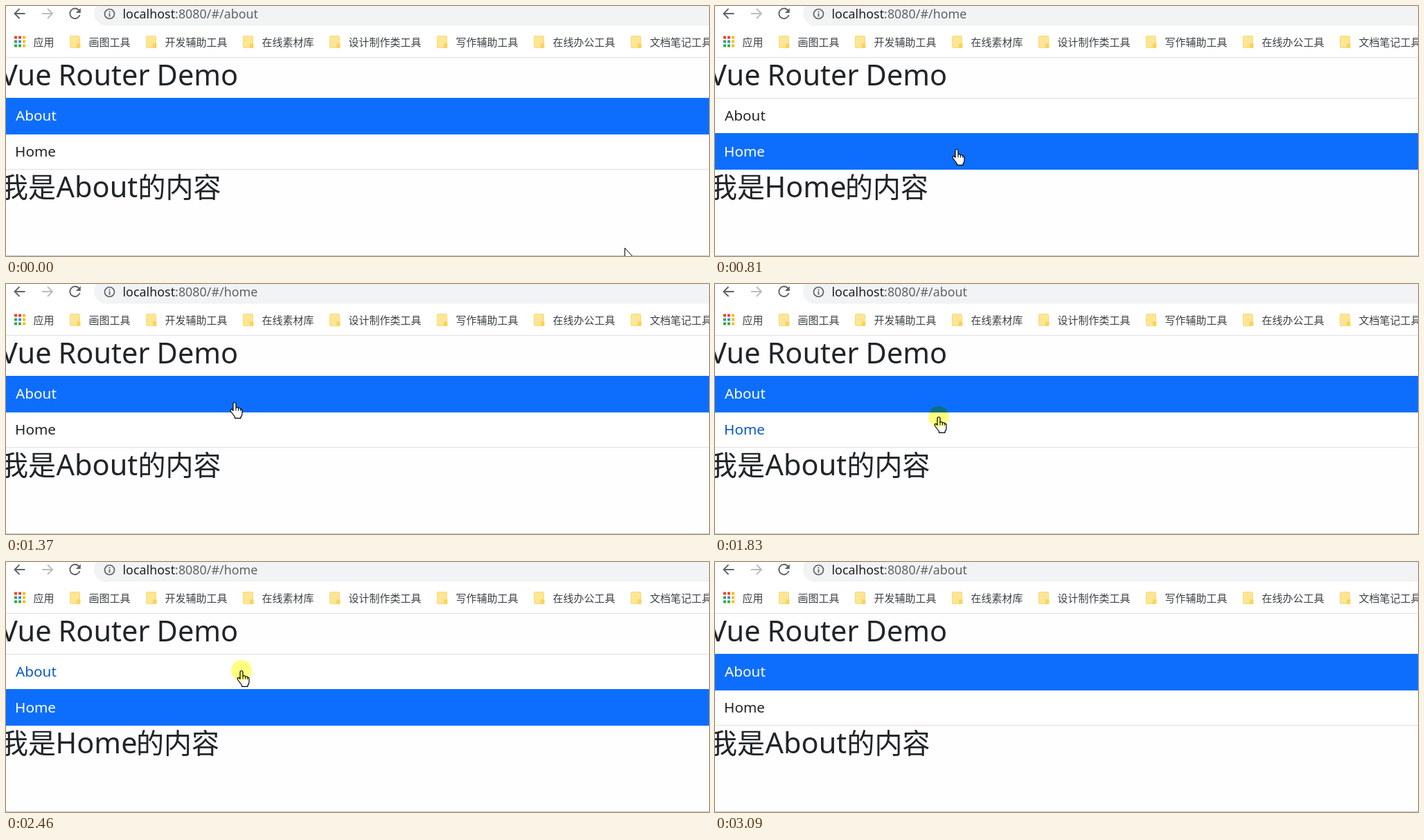
An HTML page that plays this animation: 1015x362 px, repeating every 3380 ms.

```html
<!DOCTYPE html>
<html lang="zh-CN">
<head>
<meta charset="utf-8">
<title>Vue Router Demo</title>
<style>
html, body { margin: 0; width: 100%; height: 100%; overflow: hidden; background: #fff; }
svg { display: block; width: 1015px; height: 362px; }
text { font-family: "Noto Sans", "Open Sans", sans-serif; fill: #212529; }
.cjk { font-family: "Noto Sans CJK SC", "Noto Sans CJK", sans-serif; }
.big { font-size: 41.5px; }
.big.cjk { font-size: 40px; }
.item { font-size: 20.75px; }
.url { font-size: 17.9px; fill: #5f6368; }
.mark { font-size: 15px; fill: #3c4043; }
.icon { fill: none; stroke: #5f6368; stroke-width: 1.9; }

/* every change is a hard cut inside one 3380 ms loop */
.anim { animation: 3380ms step-end infinite; }
#cursor { animation-name: move; }
#arrow { animation-name: arrow; }
#hand { animation-name: hand; }
#ring { animation-name: ring; mix-blend-mode: multiply; }
.about-view { animation-name: about-view; }
.home-view { animation-name: home-view; }
.about-url { animation-name: about-url; }
.home-url { animation-name: home-url; }
#about { animation-name: about-link; }
#home { animation-name: home-link; }

@keyframes move {
  0% { transform: translate(893px, 350px); }
  2.07% { transform: translate(750px, 300px); }
  3.84% { transform: translate(598px, 234px); }
  11.24% { transform: translate(540px, 230px); }
  13.31% { transform: translate(450px, 216px); }
  15.38% { transform: translate(380px, 209px); }
  17.45% { transform: translate(349px, 207px); }
  28.4% { transform: translate(345px, 198px); }
  30.76% { transform: translate(335px, 181px); }
  33.13% { transform: translate(330px, 171px); }
  44.67% { transform: translate(329px, 176px); }
  47.04% { transform: translate(326px, 187px); }
  49.11% { transform: translate(323px, 192px); }
  61.24% { transform: translate(325px, 187px); }
  63.31% { transform: translate(332px, 170px); }
  65.68% { transform: translate(340px, 157px); }
  77.21% { transform: translate(365px, 166px); }
  79.58% { transform: translate(455px, 197px); }
  81.95% { transform: translate(600px, 241px); }
  84.02% { transform: translate(760px, 290px); }
  86.39% { transform: translate(899px, 331px); }
  88.75% { transform: translate(932px, 352px); }
  91.42%, 100% { transform: translate(960px, 400px); }
}
@keyframes arrow {
  0%, 81.95%, 100% { opacity: 1; }
  3.84% { opacity: 0; }
}
@keyframes hand {
  0%, 81.95%, 100% { opacity: 0; }
  3.84% { opacity: 1; }
}
@keyframes ring {
  0%, 23.96%, 40.53%, 56.21%, 75.14%, 100% { opacity: 0; }
  22.18%, 38.16%, 54.14%, 72.78% { opacity: 1; }
}
@keyframes about-view {
  0%, 40.53%, 75.14%, 100% { opacity: 1; }
  23.96%, 56.21% { opacity: 0; }
}
@keyframes home-view {
  0%, 40.53%, 75.14%, 100% { opacity: 0; }
  23.96%, 56.21% { opacity: 1; }
}
@keyframes about-url {
  0%, 42.6%, 75.14%, 100% { opacity: 1; }
  23.96%, 56.21% { opacity: 0; }
}
@keyframes home-url {
  0%, 42.6%, 75.14%, 100% { opacity: 0; }
  23.96%, 56.21% { opacity: 1; }
}
@keyframes about-link {
  0%, 40.53%, 75.14%, 100% { fill: #fff; }
  23.96%, 56.21% { fill: #212529; }
  30.76%, 63.31% { fill: #0a58ca; }
}
@keyframes home-link {
  0%, 40.53%, 75.14%, 81.95%, 100% { fill: #212529; }
  3.84%, 47.04%, 79.58% { fill: #0a58ca; }
  23.96%, 56.21% { fill: #fff; }
}
</style>
</head>
<body>
<svg viewBox="0 0 1015 362">
  <defs>
    <g id="folder">
      <rect x=".5" y=".5" width="14" height="17" rx="1.5" fill="#ffe694" stroke="#f7d978"/>
      <path d="M10 18v-5.5q0-1.5 1.5-1.5h2.5q1.5 0 1.5 1.5v4q0 1.5-1.5 1.5z" fill="#fbd25f"/>
    </g>
  </defs>

  <!-- address bar -->
  <rect x="127" y="-7" width="920" height="35.5" rx="17.75" fill="#f1f3f4"/>
  <path class="icon" d="M27.5 11H13M19.5 4L12.5 11L19.5 18"/>
  <path class="icon" d="M52 11H66.5M60 4L67 11L60 18" style="stroke:#babcbe"/>
  <path class="icon" d="M105.5 6.5A7.3 7.3 0 1 0 106.6 13"/>
  <path d="M107.8 3v7h-7z" fill="#5f6368"/>
  <circle class="icon" cx="149.5" cy="11.5" r="7" style="stroke-width:1.7"/>
  <path d="M148.6 10.5h1.8v5h-1.8zM148.6 7.5h1.8v1.8h-1.8z" fill="#5f6368"/>
  <text id="host" class="url" x="168.5" y="18"><tspan fill="#202124">localhost</tspan>:8080/#/</text>
  <g id="paths"></g>

  <!-- bookmarks -->
  <g id="marks"></g>
  <rect y="74" width="1015" height="1" fill="#dcdee1"/>

  <!-- page -->
  <rect y="75" width="1015" height="287" fill="#fefefe"/>
  <text class="big" x="-8" y="115" word-spacing="-.8">Vue Router Demo</text>
  <rect y="133" width="1015" height="104" fill="#dfdfdf"/>
  <rect y="134" width="1015" height="102" fill="#fff"/>
  <rect class="anim about-view" y="133" width="1015" height="53" fill="#0d6efd"/>
  <rect class="anim home-view" y="184" width="1015" height="53" fill="#0d6efd"/>
  <text id="about" class="item anim" x="14" y="166">About</text>
  <text id="home" class="item anim" x="13" y="218">Home</text>

  <text class="big cjk" x="-8" y="277">我是</text>
  <g class="anim about-view">
    <text class="big" x="72.5" y="277">About</text>
    <text class="big cjk" x="190.5" y="277">的内容</text>
  </g>
  <g class="anim home-view">
    <text class="big" x="71.5" y="277">Home</text>
    <text class="big cjk" x="188" y="277">的内容</text>
  </g>
  <rect y="361" width="1015" height="1" fill="#c8c8c8"/>

  <g id="cursor" class="anim">
    <path id="arrow" class="anim" d="M.5 .5V17L4.5 13.2L7 18.8H9.3L7 12.8H11.8Z" fill="#fff" stroke="#000"/>
    <g id="hand" class="anim" stroke="#000" stroke-width="1.2" stroke-linejoin="round">
      <path d="M-2 2.5a2 2 0 0 1 4 0V8q3-1 3.5 1q3-.8 3.3 1.2q2.2-.3 2.2 2V17q0 2.5-2 4.5V23.4H.5V21.5L-5 14q-1.6-2.5 0-3.5q1.5-.5 3 1.8Z" fill="#fff"/>
      <path d="M2 8v4.5M5.5 9v3.5M8.8 10.2v2.8" fill="none" stroke-width="1"/>
    </g>
    <circle id="ring" class="anim" r="15" fill="#ffff80"/>
  </g>
</svg>
<script>
const NS = 'http://www.w3.org/2000/svg';

function add(parent, tag, attrs, content = '') {
  const el = document.createElementNS(NS, tag);
  for (const key in attrs) el.setAttribute(key, attrs[key]);
  el.textContent = content;
  return parent.appendChild(el);
}

// the last part of the address follows the fixed part
const host = document.getElementById('host');
const paths = document.getElementById('paths');
const end = 168.5 + host.getComputedTextLength();
for (const name of ['about', 'home']) {
  add(paths, 'text', { class: `url anim ${name}-url`, x: end, y: 18 }, name);
}

const marks = document.getElementById('marks');
const [red, yellow, green, blue] = ['#ea4335', '#fbbc04', '#34a853', '#4285f4'];
[red, red, yellow, green, blue, yellow, green, green, yellow].forEach((fill, i) => {
  add(marks, 'rect', { x: 12 + i % 3 * 6, y: 43.5 + Math.floor(i / 3) * 6, width: 4, height: 4, fill });
});
add(marks, 'text', { class: 'mark cjk', x: 39.5, y: 58 }, '应用');

const labels = ['画图工具', '开发辅助工具', '在线素材库', '设计制作类工具', '写作辅助工具', '在线办公工具', '文档笔记工具'];
let x = 92;
for (const label of labels) {
  add(marks, 'use', { href: '#folder', x, y: 43 });
  add(marks, 'text', { class: 'mark cjk', x: x + 27.5, y: 58 }, label);
  x += 50 + label.length * 15;
}
</script>
</body>
</html>
```
